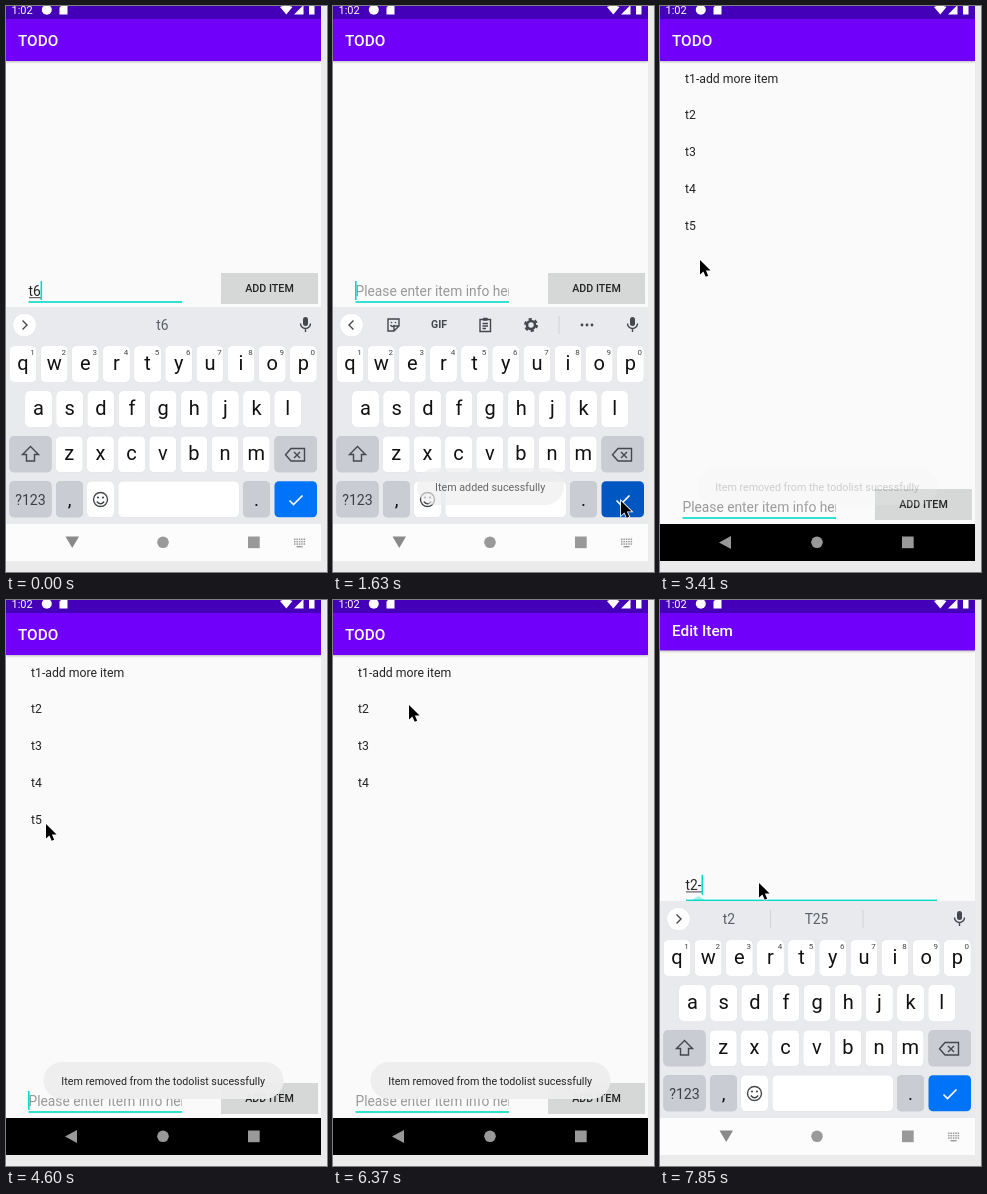
An HTML page for the animation above (8 s loop, 321 by 566 pixels).

```html
<!DOCTYPE html>
<html lang="en">
<head>
<meta charset="utf-8">
<title>Todo list</title>
<style>
html, body { margin: 0; width: 100%; height: 100%; overflow: hidden; background: #ebebeb; }
svg { display: block; width: 321px; height: 566px; font-family: Roboto, "Liberation Sans", sans-serif; }
text { white-space: pre; }
.mid { text-anchor: middle; }
.med { font-weight: 500; }
.line { fill: none; stroke: #44474c; stroke-width: 1.4; }
.btn { filter: drop-shadow(0 .8px .7px #0005); }
.key { filter: drop-shadow(0 .8px .3px #0003); }
.bar { filter: drop-shadow(0 1px 1.2px #0004); }
</style>
</head>
<body>
<svg id="stage" viewBox="0 0 321 566"></svg>
<script>
const LOOP = 8000, TEAL = '#00dcc8', INK = '#242424', GREY = '#c9ccd3';

const box = (x, y, w, h, fill, r = 0, more = '') =>
  `<rect x="${x}" y="${y}" width="${w}" height="${h}" rx="${r}" fill="${fill}" ${more}/>`;
const text = (x, y, s, size, fill = INK, cls = '', more = '') =>
  `<text x="${x}" y="${y}" font-size="${size}" fill="${fill}" class="${cls}" ${more}>${s}</text>`;
const path = (d, more = 'class="line"') => `<path d="${d}" ${more}/>`;
const dot = (x, y, r, fill, more = '') => `<circle cx="${x}" cy="${y}" r="${r}" fill="${fill}" ${more}/>`;
const group = (id, ...parts) => `<g id="${id}">${parts.join('')}</g>`;

const button = (x, y, w, h) => box(x, y, w, h, '#d6d7d7', 1.5, 'class="btn"');
const label = (x, y, s) => text(x, y, s, 10.72, INK, 'mid med');
const page = title => box(0, 0, 315, 560, '#fafafa') +
  box(0, 0, 315, 55, '#7000fa', 0, 'class="bar"') + text(12, 40.4, title, 15.3, '#fff', 'med');

function listPage() {
  const items = ['t1-add more item', 't2', 't3', 't4', 't5', 't6'];
  const rows = items.map((s, i) => text(25, 76.7 + i * 36.77, s, 12.26, INK, '', `id="item${i + 1}"`));
  const form = group('form',
    group('typed', text(22.5, 290, 't6', 13.79), box(23, 291.2, 12, 1, '#444')),
    `<g clip-path="url(#field)">${text(22.5, 290, 'Please enter item info here', 13.79, '#999', '', 'id="hint"')}</g>`,
    box(22.5, 295.2, 153.5, 1.6, TEAL),
    box(22, 275, 1.6, 19, TEAL, 0, 'id="caret"'),
    button(215, 267, 97, 31), label(263.5, 286.3, 'ADD ITEM'));
  return group('list', page('TODO'), group('rows', ...rows), form);
}

function editPage() {
  return group('edit', page('Edit Item'),
    text(25.5, 294.6, 't2', 13.79, INK, '', 'id="entry"'),
    box(26, 296, 12, 1, '#444', 0, 'id="under"'),
    box(26, 304.2, 251, 1.7, TEAL),
    box(37.8, 279.5, 1.7, 20, TEAL, 0, 'id="editCaret"'),
    path('M38.5 300.5L44 304A7.5 7.5 0 1 1 33 304Z', `id="handle" fill="${TEAL}"`),
    button(187, 317, 89, 27), label(231.5, 334.3, 'SAVE'),
    button(187, 352.5, 88.5, 30), label(231, 367, 'TASK'), label(231, 379.6, 'COMPLETED'));
}

function keyboard() {
  const key = (x, row, w, fill = '#fff') => box(x, 340 + row * 45.1, w, 36, fill, 4.5, 'class="key"');
  const letters = (s, x, row) => [...s].map((c, i) => {
    const cx = x + i * 31.15;
    return key(cx - 13.5, row, 27) + text(cx, 364 + row * 45, c, 20, '#111', 'mid') +
      (row ? '' : text(cx + 9.5, 349, (i + 1) % 10, 8, '#444', 'mid'));
  }).join('');
  const divider = x => box(x, 310, 1, 18, '#cfd1d5');
  const word = (x, s) => text(x, 324, s, 13.8, '#5b5f64', 'mid');
  const more = path('M16.5 314.5l4.5 4.5-4.5 4.5');
  const tools = group('tools',
    path('M20.5 314.5l-4.5 4.5 4.5 4.5'),
    path('M55 313h11v7l-5 5h-6zM66 320h-5v5M57.5 319q2 3 4 0'), dot(58.5, 316.5, .8, '#44474c'), dot(62.5, 316.5, .8, '#44474c'),
    text(106, 322.4, 'GIF', 10.5, '#44474c', 'mid', 'font-weight="700"'),
    path('M147 313.5h10.5v12H147zM149.5 317.5h5.5M149.5 320h5.5M149.5 322.5h3.5'), box(149.8, 311.8, 5, 3, '#44474c', 1),
    dot(198, 319, 4, 'none', 'stroke="#44474c" stroke-width="2.6"'),
    dot(198, 319, 6, 'none', 'stroke="#44474c" stroke-width="2" stroke-dasharray="3.2 3.08"'),
    divider(225.5), ...[249, 254, 259].map(x => dot(x, 319, 1.4, '#44474c')));
  return group('keys',
    box(0, 301, 315, 260, '#e8eaed'), dot(18.5, 319, 11.5, '#fff', 'class="key"'),
    group('wordsA', more, word(156.5, 't6')), tools,
    group('wordsB', more, word(69, 't2'), divider(110), word(156.5, 'T25'), divider(202.5)),
    box(297, 311, 5, 9, '#44474c', 2.5), path('M294.5 317.5a5 5 0 0 0 10 0M299.5 322.5v3.5'),
    letters('qwertyuiop', 17, 0), letters('asdfghjkl', 32.5, 1), letters('zxcvbnm', 63.3, 2),
    key(3.5, 2, 42, GREY), path('M24.5 440.5l8 8h-4v6.5h-8v-6.5h-4z'),
    key(268.5, 2, 42.5, GREY), path('M285 442.5h13.5v12.5H285l-5.5-6.25zM288 446l6 6M294 446l-6 6'),
    key(3.5, 3, 42, GREY), text(24.5, 499, '?123', 14.2, '#3c4043', 'mid'),
    key(50, 3, 27, GREY), text(63.5, 500, ',', 19, '#111', 'mid'),
    key(81, 3, 27), dot(94.5, 493.5, 7, 'none', 'class="line"'),
    dot(92, 491.5, 1.1, '#44474c'), dot(97, 491.5, 1.1, '#44474c'), path('M90.8 495.5q3.7 4.5 7.4 0'),
    key(112.3, 3, 120.7), key(237, 3, 27, GREY), text(250.5, 500, '.', 19, '#111', 'mid'),
    box(268.5, 475.3, 42.5, 36, '#0074f8', 4.5, 'id="enter"'),
    path('M283.5 494.5l4 4 9-9', 'fill="none" stroke="#fff" stroke-width="1.6"'));
}

function navBar() {
  const dots = [0, 1, 2].map(r => [0, 1, 2, 3, 4].map(c => box(288 + c * 2.4, 532.5 + r * 2.4, 1.5, 1.5, '#999')).join(''));
  return box(0, 518, 315, 37, '#000', 0, 'id="navBack"') +
    path('M71 530v13l-12-6.5z', 'id="backLeft" fill="#999"') +
    path('M59.5 530.5h13.5l-6.75 11.5z', 'id="backDown" fill="#8a8a8a"') +
    dot(157, 536.3, 5.8, '#999') + box(242, 530.5, 11.7, 11.7, '#999') +
    group('switcher', ...dots, box(290.5, 540, 6, 1.4, '#999'));
}

const status = box(0, 0, 315, 13, '#4400b8') + text(5.5, 8, '1:02', 11, '#fff') +
  dot(40.8, 3.8, 5, '#fff') +
  path('M53.5 8.5V1.5l2.5-2.5h5.5v9.5zM274 1q6-3 12.5 0l-6.2 7.6zM288 8.5l9.5-9.5v9.5zM303 -1h5.5v9.5H303z', 'fill="#fff"');
const toast = (id, x, w, s) => group(id, box(x, 462, w, 37, '#eee', 18.5, 'fill-opacity=".96"'),
  text(157.2, 485, s, 10.72, INK, 'mid'));

stage.innerHTML = `<defs>
  <clipPath id="phone"><rect width="315" height="555"/></clipPath>
  <clipPath id="field"><rect x="22" y="270" width="154" height="26"/></clipPath></defs>
  <g clip-path="url(#phone)">${listPage()}${editPage()}${status}${keyboard()}${navBar()}
  ${toast('added', 84, 147, 'Item added sucessfully')}
  ${toast('removed', 37.5, 240, 'Item removed from the todolist sucessfully')}</g>
  ${group('mouse', path('M0 0V14.5L3.4 11.4 5.7 16.8 8.2 15.7 5.9 10.5H10.6Z',
    'stroke="#fff" stroke-width="1.6" paint-order="stroke"'))}`;

const el = id => document.getElementById(id);
const show = (id, on) => el(id).style.display = on ? '' : 'none';
const fade = (id, a) => { show(id, a > 0); el(id).style.opacity = a; };
const move = (id, x, y) => el(id).setAttribute('transform', `translate(${x} ${y})`);
const ramp = (t, a, b) => Math.min(1, Math.max(0, (t - a) / (b - a)));
const pulse = (t, a, b, c, d) => ramp(t, a, b) * (1 - ramp(t, c, d));
const ease = p => p * p * (3 - 2 * p);

// time, x, y of the pointer tip
const route = [[0, 330, 530], [250, 330, 530], [450, 312, 528], [950, 288, 495], [1660, 288, 495],
  [1920, 241, 502], [2220, 190, 420], [2400, 190, 420], [2800, 46, 231], [3050, 40, 254], [3420, 40, 254],
  [4000, 40, 224], [5150, 40, 224], [5850, 76, 105], [6600, 76, 105], [7100, 99, 283], [LOOP, 99, 283]];

function pointer(t) {
  const i = route.findIndex(p => p[0] > t), [a, x, y] = route[i - 1], [b, u, v] = route[i];
  const p = ease(ramp(t, a, b));
  move('mouse', x + (u - x) * p, y + (v - y) * p);
}

function draw(t) {
  const cleared = t >= 1300, closed = t >= 1700, tapped = t >= 7200, pan = t >= 7400 ? -4.6 : 0;
  const open = ease(ramp(t, 6380, 6640)), typing = t >= 7800;

  show('rows', closed);
  show('item6', t < 3100);
  show('item5', t < 4880);
  show('typed', !cleared);
  show('hint', cleared);
  show('caret', t < 300 || t > 800 && t < 2100 || t >= 2100 && (t - 1600) % 1000 < 500);
  el('caret').setAttribute('x', cleared ? 22 : 34.5);
  move('form', 0, closed ? 216 : 0);

  fade('edit', open);
  move('edit', 0, pan + 24 * (1 - open));
  el('entry').textContent = typing ? 't2-' : 't2';
  el('under').setAttribute('width', typing ? 16 : 12);
  el('editCaret').setAttribute('x', typing ? 41.5 : 37.8);
  show('editCaret', tapped);
  fade('handle', tapped ? 1 - .65 * ramp(t, 7750, 7840) : 0);

  const up = t < 4000 ? 1 - ramp(t, 1680, 1860) : ease(ramp(t, 7400, 7660)), light = up > .4;
  show('keys', up > 0);
  move('keys', 0, 217 * (1 - up));
  show('wordsA', !cleared);
  show('tools', cleared && t < 4000);
  show('wordsB', t > 4000);
  el('enter').setAttribute('fill', t > 1050 && t < 4000 ? '#0057c2' : '#0074f8');

  el('navBack').setAttribute('fill', light ? '#fcfcfc' : '#000');
  show('backDown', light);
  show('backLeft', !light);
  show('switcher', light || tapped);

  fade('added', pulse(t, 1430, 1720, 2850, 3100));
  fade('removed', pulse(t, 3350, 3650, 5180, 5380) + pulse(t, 5430, 5700, 7380, 7620));
  pointer(t);
}

function tick(now) {
  draw(now % LOOP);
  requestAnimationFrame(tick);
}
draw(0);
requestAnimationFrame(tick);
</script>
</body>
</html>
```
